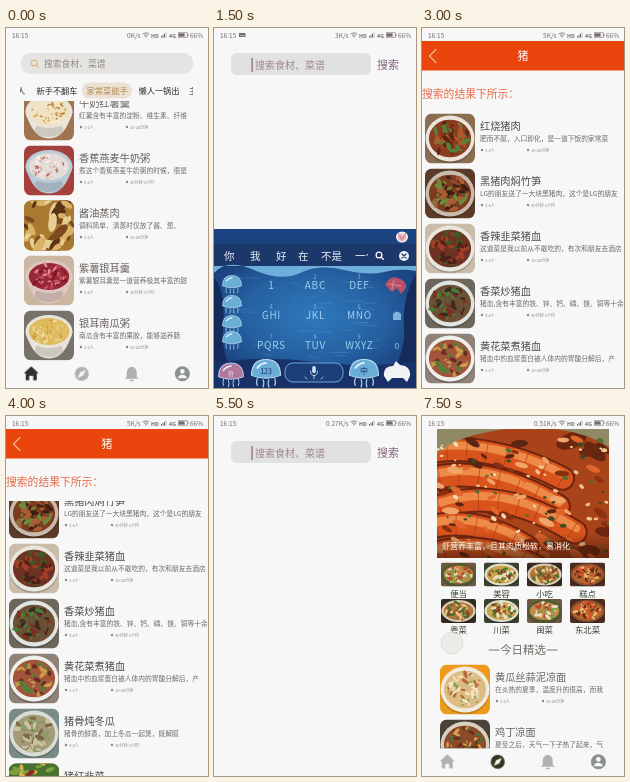
These frames come from a looping animation (202 px wide and 360 px high, 8000 ms). An HTML page:

```html
<!DOCTYPE html>
<html lang="zh-CN">
<head>
<meta charset="utf-8">
<title>菜谱搜索</title>
<style>
html, body { margin: 0; width: 100%; height: 100%; overflow: hidden; background: #f7f7f7; }
svg { display: block; width: 100vw; height: 100vh; }
text { font-family: "Noto Sans CJK SC", "Noto Sans CJK", "Noto Sans", sans-serif; white-space: pre; }
.step { animation-duration: 8s; animation-timing-function: step-end; animation-iteration-count: infinite; }
.keys text { letter-spacing: .7px; font-weight: 500; }
</style>
</head>
<body>
<svg id="stage" viewBox="0 0 202 360"></svg>
<script>
const LOOP = 8000;
let css = '', uid = 0;

// Stepped property: stops are [ms, value] pairs.
function steps(prop, stops, body) {
  const name = 's' + uid++;
  const frames = stops.map(([ms, v]) => `${ms / LOOP * 100}%{${prop}:${v}}`).join('');
  css += `@keyframes ${name}{${frames}}.${name}{animation-name:${name}}`;
  return `<g class="step ${name}">${body}</g>`;
}

// Visible only inside the given [from, to] spans.
function show(body, ...spans) {
  const stops = spans[0][0] > 0 ? [[0, 0]] : [];
  for (const [a, b] of spans) {
    stops.push([a, 1]);
    if (b < LOOP) stops.push([b, 0]);
  }
  return steps('opacity', stops, body);
}

const scroll = (stops, body) =>
  steps('transform', stops.map(([ms, y]) => [ms, `translateY(${y}px)`]), body);
const text = (x, y, size, color, str, extra = '') =>
  `<text x="${x}" y="${y}" font-size="${size}" fill="${color}" ${extra}>${str.replace(/&/g, '&amp;')}</text>`;
const mid = (x, y, size, color, str) => text(x, y, size, color, str, 'text-anchor="middle"');
const rect = (x, y, w, h, color, r = 0) =>
  `<rect x="${x}" y="${y}" width="${w}" height="${h}" rx="${r}" fill="${color}"/>`;
const oval = (x, y, rx, ry, color, extra = '') =>
  `<ellipse cx="${x}" cy="${y}" rx="${rx}" ry="${ry}" fill="${color}" ${extra}/>`;
const tilted = (x, y, rx, ry, color, deg) =>
  at(x.toFixed(1), y.toFixed(1), oval(0, 0, rx.toFixed(1), ry.toFixed(1), color, `transform="rotate(${Math.round(deg)})"`));
const line = (d, stroke, w = 1, extra = '') =>
  `<path d="${d}" fill="none" stroke="${stroke}" stroke-width="${w}" stroke-linecap="round" ${extra}/>`;
const fill = (d, color) => `<path d="${d}" fill="${color}"/>`;
const at = (x, y, body, extra = '') => `<g transform="translate(${x} ${y})" ${extra}>${body}</g>`;
const sized = (x, y, s, body) => `<g transform="translate(${x} ${y}) scale(${s})">${body}</g>`;
const clip = (id, body) => `<g clip-path="url(#${id})">${body}</g>`;
const clipBox = (id, x, y, w, h, r = 0) => `<clipPath id="${id}">${rect(x, y, w, h, '#000', r)}</clipPath>`;
const times = (n, fn) => Array.from({ length: n }, (_, i) => fn(i)).join('');

function random(seed) {
  return () => (seed = (seed * 16807 + 11) % 2147483647) / 2147483647;
}

// Plate size and centre as shares of the picture.
const shapes = { plate: [.49, .46, .5], bowl: [.47, .33, .42], full: [.8, .75, .5] };

// A dish; colours: table, plate, food, then garnish.
function dish(x, y, w, h, colors, seed, big = 1, kind = 'plate') {
  const [table, plate, food, ...bits] = colors.split(' ').map(c => '#' + c);
  const [sx, sy, sc] = shapes[kind];
  const rx = w * sx, ry = h * sy, cx = w / 2, cy = h * sc;
  const rnd = random(seed * 7919 + 17);
  rnd();
  const garnish = times(44, i => {
    const a = rnd() * 6.28, r = Math.sqrt(rnd()) * .74;
    const s = (rnd() + .5) * w / 38 * big;
    return tilted(cx + Math.cos(a) * r * rx, cy + Math.sin(a) * r * ry, s * 1.7, s * .75, bits[i % bits.length], rnd() * 180);
  });
  const base = kind === 'bowl'
    ? fill(`M${cx - rx} ${cy}Q${cx - rx * .7} ${h * .96} ${cx} ${h * .96}T${cx + rx} ${cy}Z`, plate) +
      oval(cx, h * .78, rx * .6, h * .15, '#000', 'opacity=".12"')
    : oval(cx, cy + 2, rx, ry, '#000', 'opacity=".18"');
  return at(x, y, rect(0, 0, w, h, table) + base + oval(cx, cy, rx, ry, plate) +
    oval(cx, cy, rx * .86, ry * .82, food) + garnish, `clip-path="url(#${w === 50 ? 'thumb' : 'tile'})"`);
}

// List row: x of the thumbnail, y of the title's centre.
function row(x, y, [title, desc, colors, big, kind], seed, dark) {
  const tx = x + 55, small = '#8c8884';
  return dish(x, y - 12.5, 50, 50, colors, seed, big, kind) +
    text(tx, y + 3.8, 10.2, dark ? '#4c4a49' : '#67615d', title) +
    text(tx, y + 14.8, 6.75, '#6c6967', desc) +
    oval(tx + 2, y + 24, 1.2, 1.2, small) + text(tx + 5, y + 25.5, 4, small, seed % 2 ? '1-2人' : '3-4人') +
    oval(tx + 48, y + 24, 1.2, 1.2, small) + text(tx + 51, y + 25.5, 4, small, seed % 2 ? '10-20分钟' : '30分钟-1小时');
}

const homeItems = [
  ['牛奶红薯羹', '红薯含有丰富的淀粉、维生素、纤维', 'a07450 e9e3d8 efe3c4 dba94c f6ecca b98a45', .8, 'bowl'],
  ['香蕉燕麦牛奶粥', '煮这个香蕉燕麦牛奶粥的时候，很是', 'a5413c b9cbd6 e4dcd8 f5f0ea d9c4b8 c46b60', .8, 'bowl'],
  ['酱油蒸肉', '调料简单，清蒸时仅放了酱、葱、', 'd8c693 d9c78e a97932 7c4a1e d9b267 5b3416 e6cf93', 3, 'full'],
  ['紫薯银耳羹', '紫薯银耳羹是一道营养极其丰富的甜', 'c9b7a0 dfc6c0 96283a c7505a 7e1727 dd8b8b', 1, 'bowl'],
  ['银耳南瓜粥', '南瓜含有丰富的果胶，能够滋养肠', '77736c e8e4d8 dfbb60 f0dc9c cf9a3e e6cb80', .9, 'bowl']
];
const resultItems = [
  ['红烧猪肉', '肥而不腻，入口即化，是一道下饭的家常菜', '8b6d50 eae4dc 8a3c1e b2592c 5d2412 55803a', 1.6],
  ['黑猪肉焖竹笋', 'LG的朋友送了一大块黑猪肉，这个是LG的朋友', '5b3b28 c9bcae 7c3c20 a85e34 3f1e14 6c8a3c', 1.5],
  ['香辣韭菜猪血', '这道菜是我以前从不敢吃的，有次和朋友去酒店', 'c9bca9 e9e5df 6e3122 a14024 3c5a28 4a2018', 1.5],
  ['香菜炒猪血', '猪血,含有丰富的铁、锌、钙、磷、镁、铜等十余', '6c665c e2e4e0 6a5136 4d7a36 7c2e20 3b2a20', 1.4],
  ['黄花菜煮猪血', '猪血中的血浆蛋白被人体内的胃酸分解后，产', '8d8178 f0eeea a2553a 6b2a22 c99a4c 5b7c38', 1.4],
  ['猪骨炖冬瓜', '猪骨的鲜香，加上冬瓜一起煲，既解腻', '7a8a86 d9dcd4 a59a78 c9c3a2 7e6848 8c9a64', 1.6],
  ['猪红韭菜', '&quot;豆腐长生,韭内常清&quot;，来吃点猪血', '3f6a44 b7c49a 47722f 7da13e 8c2f22 d9b04a', 1.9, 'full'],
  ['绿豆荷叶猪腱汤', '这两天身体不舒服，但手边的工作还一直忙不', 'a9b2b4 eef0ec c08a48 8a4a28 6a8038 dcae68', 1.2],
  ['啤酒烧猪蹄', '做酒炖蹄皮，一上桌就会被秒扫的那种。感香', '54463c d5cbbd 7e3518 a9522a 4c1c10 56803a', 1.8],
  ['红焖猪脚黄豆', '猪脚含有丰富的胶原蛋白，软糯香浓又入味', '6f8a88 dfe3dc 94401c c06a2c d9a34a 5c2412', 1.5]
];
const dailyItems = [
  ['黄瓜丝蒜泥凉面', '在炎热的夏季，温度升的很高，而我', 'ee9a1c f1ece0 dcbb84 86a24c f0dcae b5683c f2e6c4', 1.2],
  ['鸡丁凉面', '夏至之后，天气一下子热了起来，气', '4a4238 d9d0c0 8c4a28 d9a04a 5a6a3c 6c2e18', 1.3]
];

function home() {
  const tabs = [[11, '人'], [30.5, '新手不翻车'], [132.5, '懒人一锅出'], [183, '主']];
  return rect(15, 25, 172, 21, '#e5e4e2', 9) + lens(28, 35, '#d9bd80') +
    text(38, 39, 8.8, '#8f8a84', '搜索食材、菜谱') +
    rect(76, 54.5, 50, 16, '#ebe2d5', 7.5) + text(80.5, 65.6, 8.3, '#b3884f', '家常菜能手') +
    clip('tabs', tabs.map(([x, s]) => text(x, 65.6, 8.2, '#2e2b29', s)).join('')) +
    clip('homeList', scroll([[0, -15], [500, 0]], homeItems.map((it, i) => row(18, 90 + i * 55, it, i + 1)).join('')));
}

function lens(x, y, color) {
  return `<circle cx="${x}" cy="${y}" r="2.9" fill="none" stroke="${color}" stroke-width="1.2"/>` +
    line(`M${x + 2.2} ${y + 2.2}l2.2 2.2`, color, 1.3);
}

function search() {
  const ink = '#85627c';
  return rect(17, 25, 140, 22, '#e1e1e1', 6) + text(163, 40.8, 11, ink, '搜索') +
    show(text(41, 40.6, 10, '#a08790', '搜索食材、菜谱') + rect(37.5, 30, 1.2, 14, ink), [0, 2000], [5500, 8000]) +
    show(text(38, 40.6, 9, '#29304e', 'zhu') + rect(54.5, 30, 1.2, 14, '#a85a88'), [2000, 2500]) +
    show(text(37.5, 40.8, 10, '#29304e', '猪') + rect(48, 30, 1.2, 14, '#a85a88'), [2500, 3000]);
}

const pig = (x, y, s) => sized(x, y, s, fill('M-5 -1L-5.5 -6L-1 -4Z M5 -1L5.5 -6L1 -4Z', '#d98c9c') +
  oval(0, 0, 5.6, 5, '#f0b6c0') + oval(0, 1.4, 2.5, 1.8, '#d98c9c') +
  oval(-2.6, -1, .7, .7, '#43303c') + oval(2.6, -1, .7, .7, '#43303c'));

const jelly = (x, y, s, color = '#6aaed8') => sized(x, y, s,
  line('M-6 5q-1 3 0 5M-2 6q1 2 0 5M2 6q-1 2 0 5M6 5q1 3 0 5', '#a9d5ec', .8) +
  `<path d="M-10 3Q-10 -8 0 -8Q10 -8 10 3Q0 7 -10 3Z" fill="${color}" stroke="#c3e3f3" stroke-width=".7"/>` +
  line('M-6 -2Q-4 -5 0 -5.6', '#e6f5fb', 1.2));

function keyboard() {
  const letters = ['1', 'ABC', 'DEF', 'GHI', 'JKL', 'MNO', 'PQRS', 'TUV', 'WXYZ'];
  const pads = letters.map((k, i) => {
    const x = 57.4 + i % 3 * 44, y = 257 + Math.floor(i / 3) * 30;
    return mid(x, y + 4, 10, '#9fd0f2', k) + (i ? mid(x, y - 6.5, 5.5, '#84b9e4', String(i + 1)) : '');
  }).join('');
  const rnd = random(41);
  const ripples = times(40, () => {
    const x = 25 + rnd() * 140, y = 246 + rnd() * 90;
    return line(`M${x.toFixed(1)} ${y.toFixed(1)}h${(4 + rnd() * 16).toFixed(1)}`, '#6fb4e6', .7, 'opacity=".3"');
  });
  const words = list => list.map(([x, s]) => text(x, 231.8, 10.5, '#eef3fa', s)).join('');
  return rect(0, 201, 202, 159, '#1b4380') + rect(0, 216, 202, 23, '#1c376a') +
    oval(188, 209, 6, 5.6, '#f4eef2') + pig(188, 209.5, .75) +
    rect(0, 239, 202, 121, 'url(#sea)') +
    fill('M0 238H202V243Q185 240 170 244T130 242T86 245T40 242T0 245Z', '#6eaedb') + ripples +
    fill('M0 250Q12 262 9 300T34 360H0Z M202 246Q188 268 190 300T166 360H202Z', '#152b5c') +
    fill('M0 335Q50 327 101 334T202 333V360H0Z', '#183168') +
    `<g class="keys">${pads}</g>` +
    [255, 275, 295, 311].map(y => jelly(18, y, .95)).join('') +
    fill('M171 257Q176 247 184 250Q193 253 192 260L187 266L183 260L178 264Z', '#b8506a') +
    line('M175 256l12 2M180 252l-2 9', '#e39aa6', .8) +
    fill('M179 286q4 -5 8 0v6h-8z', '#7fb2de') + mid(183, 321, 8, '#9fd0f2', '0') +
    jelly(17, 345, 1.25, '#b0789c') + mid(17, 348, 6, '#f6e2ec', '符') +
    jelly(52, 343, 1.45) + mid(52, 346, 7, '#12305f', '123') +
    `<rect x="71" y="335" width="58" height="19" rx="8" fill="#1b3f78" stroke="#6ba8d8" stroke-width="1"/>` +
    rect(98.2, 338, 3.6, 7, '#cfe4f5', 1.8) + line('M96.5 343q0 4.5 3.5 4.5t3.5 -4.5M100 347.5v3', '#cfe4f5', .8) +
    line('M91 349l2 2M109 349l-2 2', '#cfe4f5', .8) +
    jelly(150, 343, 1.45) + mid(150, 346, 8, '#12305f', '中') +
    fill('M170 348Q169 338 179 338L182 333L186 337Q197 338 196 348L193 354L189 350H178L174 354Z', '#f1f3f7') +
    show(words([[10, '你'], [36, '我'], [62, '好'], [84, '在'], [107, '不是']]), [1500, 2000]) +
    show(words([[10, '猪'], [36, '主'], [62, '住'], [84, '祝'], [107, '注意']]), [2000, 2500]) +
    show(words([[10, '猪'], [62, '头'], [84, '蹄'], [107, '队友']]) + pig(43, 228, 1.1), [2500, 3000]) +
    clip('cand', text(141, 231.8, 10.5, '#eef3fa', '一个')) + lens(165, 227, '#fff') +
    oval(190, 228, 5, 5, '#eef3fa') + line('M188 226l4 4m0 -4l-4 4', '#1c376a', 1.2);
}

function results() {
  const path = [[0, 0], [3500, -22], [4000, -68], [4500, -165], [5000, -242]];
  return rect(0, 13, 202, 29.5, '#e9450c') + line('M14 21.5L7.5 28L14 34.5', '#f8b792', 1.2) + mid(101, 32, 11, '#fff', '猪') +
    text(0, 70, 10.8, '#e46a48', '搜索的结果下所示：') +
    clip('resultList', scroll(path, resultItems.map((it, i) => row(3, 98 + i * 55, it, i + 11, true)).join('')));
}

function hero() {
  const rnd = random(97);
  const flecks = (n, colors, size, stretch) => times(n, i => {
    const s = size * (.4 + rnd());
    return tilted(rnd() * 172, 10 + rnd() * 119, s * stretch, s, colors[i % colors.length], rnd() * 70 - 20);
  });
  const prawns = times(5, i => {
    const x = rnd() * 50 - 30, y = 22 + i * 25, len = 110 + rnd() * 60;
    const d = `M${x} ${y + 6}q${len * .45} -22 ${len} ${8 + rnd() * 18}`;
    return line(d, '#6f2410', 25) + line(d, '#d9531c', 21) + line(d, '#ee8a48', 8, 'transform="translate(1 -4)"') +
      line(d, '#a53612', 20, 'stroke-dasharray="1 19" opacity=".6" style="stroke-linecap:butt"');
  });
  return at(15, 13, rect(0, 0, 172, 129, '#a8431a') + flecks(30, ['#6b2610', '#d9622a'], 6, 2) +
    prawns + fill('M0 0H70Q24 5 0 24Z M118 0H172V18Q150 4 118 0Z', '#8f8a64') +
    flecks(60, ['#8a2f12', '#f0a468', '#e2662c', '#5c2412'], 2.6, 2.4) +
    flecks(80, ['#f4d9ac', '#55702f', '#f2c490', '#3c4a1e'], 1.5, 1.6) +
    rect(0, 104, 172, 25, 'url(#shade)'), 'clip-path="url(#hero)"') +
    text(20, 133, 8, '#fff', '虾营养丰富，且其肉质松软，易消化');
}

function discover() {
  const kinds = ['便当', '美容', '小吃', '糕点', '粤菜', '川菜', '闽菜', '东北菜'];
  const looks = ['6c5a40 4b5a30 c08a48 7da13e e8ddc0 b5482c', '39412f dfe0d0 c9a44c 4b7a34 e8e0c4 8c3a22',
    '352a20 d5cdb8 b5783c 8a4a28 e9c98a 4f7030', '4a2d20 8c4e2c b0682f e9b868 6b2a16 d9542c'];
  const grid = kinds.map((k, i) => {
    const x = 19 + i % 4 * 43, y = i < 4 ? 146.5 : 183;
    return dish(x, y, 35, 24, looks[(i < 4 ? i : i * 3 + 2) % 4], i + 31, 1.5) + mid(x + 17.5, y + 34, 8.4, '#3a4532', k);
  }).join('');
  return hero() + grid + line('M67 234h10M125 234h10', '#77776c', 1) + mid(101, 238.2, 11.4, '#71716a', '今日精选') +
    clip('homeList', dailyItems.map((it, i) => row(18, 261 + i * 55, it, i + 51)).join(''));
}

function nav() {
  const house = c => fill('M25.5 337.5L33 344.5H31V351.5H27.5V347H23.5V351.5H20V344.5H18Z', c);
  const compass = c => oval(76, 345, 7, 7, c) + fill('M80 341L77.6 346.6L72 349L74.4 343.4Z', '#f7f7f7');
  const idle = '#b0b0b0';
  return rect(0, 332.5, 202, 28, '#f7f7f7') + at(-.3, .8,
    show(house('#303030') + compass(idle), [0, 6500]) +
    show(house(idle) + compass('#33361f'), [6500, 8000]) +
    fill('M126 338Q131 339 131 344V348L133 350H119L121 348V344Q121 339 126 338Z', idle) + rect(124, 351, 4, 1.5, idle, .7) +
    oval(176.7, 345, 7.5, 7.5, '#8b918f') + oval(176.7, 342.6, 2.3, 2.4, '#f7f7f7') +
    fill('M172.2 349.5Q172.7 346 176.7 346T181.2 349.5Z', '#f7f7f7'));
}

function statusBar() {
  const ink = '#75696f';
  const rates = [['0K/s', 0, 1000], ['3K/s', 1000, 2000], ['0K/s', 2000, 3000], ['5K/s', 3000, 4500],
    ['0.27K/s', 4500, 6000], ['0.51K/s', 6000, 8000]];
  const t = (x, s, size = 6.5, extra = '') => text(x, 9.6, size, ink, s, extra);
  return t(6, '16:15') + rates.map(([s, a, b]) => show(t(134.5, s, 6.5, 'text-anchor="end"'), [a, b])).join('') +
    show(rect(25, 5, 6.5, 4, ink, .6) + line('M26.5 7.6h3.5', '#f7f7f7', .6), [1500, 3000]) +
    line('M137 5.8q3 -2.4 6 0M138.3 7.3q1.7 -1.3 3.4 0', ink, .8) + oval(140, 8.7, .7, .7, ink) +
    t(145, 'HD', 5.3, 'font-weight="bold"') + times(4, i => rect(155 + i * 1.5, 8 - i * 1.1, 1, 1.6 + i * 1.1, i < 3 ? ink : '#bbb')) +
    t(163, '4G', 5.3, 'font-weight="bold"') +
    `<rect x="172.3" y="4.8" width="9" height="4.4" fill="none" stroke="${ink}" stroke-width=".6"/>` +
    rect(173, 5.4, 5.6, 3.2, ink) + rect(181.5, 6.2, .9, 1.6, ink) + t(184, '66%');
}

const touch = (x, y, r, from, to) =>
  show(`<circle cx="${x}" cy="${y}" r="${r}" fill="#e2e3dd" fill-opacity=".6" stroke="#c9c9c0" stroke-opacity=".6" stroke-width=".8"/>`, [from, to]);

const defs = '<defs>' + clipBox('thumb', 0, 0, 50, 50, 7) + clipBox('tile', 0, 0, 35, 24, 2) + clipBox('hero', 0, 0, 172, 129) +
  clipBox('tabs', 14, 50, 173, 24) + clipBox('homeList', 15, 73.5, 172, 259) + clipBox('resultList', 0, 85, 202, 275) +
  clipBox('cand', 141, 216, 13, 24) +
  '<radialGradient id="sea" cy=".4" r=".65"><stop stop-color="#2f79bb"/><stop offset=".55" stop-color="#2560a0"/><stop offset="1" stop-color="#173a75"/></radialGradient>' +
  '<linearGradient id="shade" x2="0" y2="1"><stop stop-color="#3a1408" stop-opacity="0"/><stop offset="1" stop-color="#3a1408" stop-opacity=".6"/></linearGradient></defs>';

document.getElementById('stage').innerHTML = defs + rect(0, 0, 202, 360, '#f7f7f7') +
  show(home(), [0, 1000], [6000, 7000]) + show(search(), [1000, 3000], [5500, 6000]) + show(keyboard(), [1500, 3000]) +
  show(results(), [3000, 5500]) + show(discover(), [7000, 8000]) +
  show(nav(), [0, 1000], [6000, 8000]) + statusBar() +
  touch(14, 21, 9, 5000, 5500) + touch(84, 339, 10, 6500, 7000) + touch(30, 227, 11, 7500, 8000);
document.head.appendChild(document.createElement('style')).textContent = css;
</script>
</body>
</html>
```
